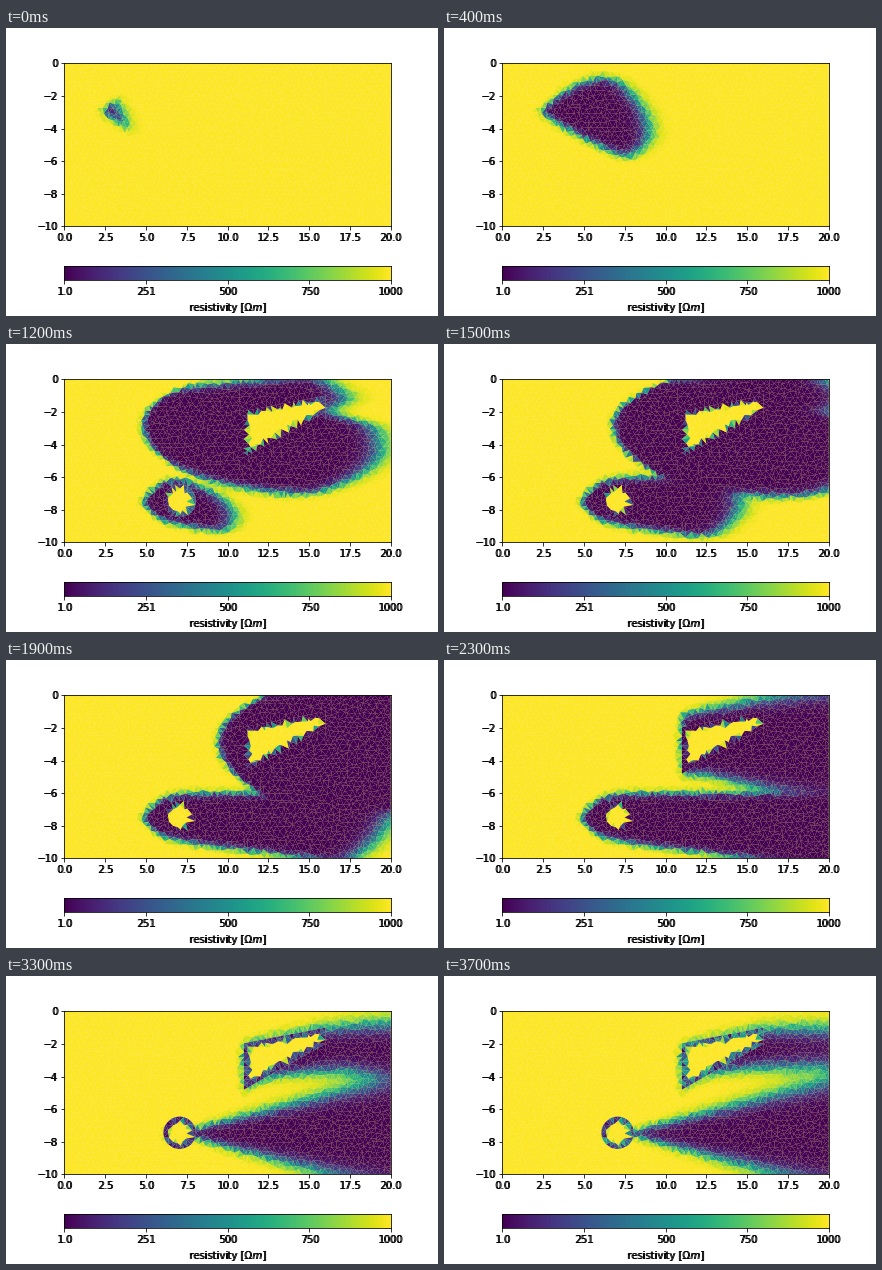
A matplotlib script that plays this animation: 432x288 px, repeating every 3.8 s.

```python
import numpy as np
import matplotlib.pyplot as plt
from matplotlib.animation import FuncAnimation
from matplotlib.collections import PolyCollection
from matplotlib.path import Path
from matplotlib.tri import Triangulation

W, H, DPI = 432, 288, 72
FRAMES, INTERVAL = 38, 100
RHO_MIN, RHO_MAX = 1, 1000
rng = np.random.default_rng(4)
plt.rcParams["font.family"] = "DejaVu Sans"

WEDGE = np.array([(11, -1.95), (16, -1), (16, -2), (11, -4.8)])
ANGLES = np.linspace(0, 2 * np.pi, 24, endpoint=False)
DISC = np.column_stack([7.06 + np.cos(ANGLES), -7.45 + np.sin(ANGLES)])


def depth_inside(points, poly):
    """Distance to the outline, positive inside."""
    edge = np.roll(poly, -1, axis=0) - poly
    rel = points[:, None] - poly
    s = np.clip((rel * edge).sum(-1) / (edge**2).sum(-1), 0, 1)
    dist = np.linalg.norm(rel - s[..., None] * edge, axis=-1).min(axis=1)
    return np.where(Path(poly).contains_points(points), dist, -dist)


def sample_outline(poly, step=0.28):
    parts = []
    for a, b in zip(poly, np.roll(poly, -1, axis=0)):
        n = max(1, round(np.linalg.norm(b - a) / step))
        parts.append(a + (b - a) * np.arange(n)[:, None] / n)
    return np.vstack(parts)


def build_mesh(nx=62, ny=36):
    points = []
    for row in range(ny + 1):
        x = np.linspace(0, 20, nx + 1) + 10 / nx * (row % 2)
        y = np.full(nx + 1, -10 * row / ny)
        inner = (x > 0.1) & (x < 19.9)
        x = x + inner * rng.uniform(-0.1, 0.1, nx + 1)
        if 0 < row < ny:
            y = y + rng.uniform(-0.1, 0.1, nx + 1)
        points.append(np.column_stack([np.clip(x, 0, 20), y]))
    points = np.vstack(points)
    for poly in (WEDGE, DISC):
        far = np.abs(depth_inside(points, poly)) > 0.18
        points = np.vstack([points[far], sample_outline(poly)])
    return points[Triangulation(*points.T).triangles]


triangles = build_mesh()
cells = triangles.mean(axis=1)
X, Y = cells.T
rough = rng.normal(0, 0.04, len(cells))
weak = rng.uniform(0, 1, len(cells))


def soft(distance, width):
    return 1 / (1 + np.exp(-np.clip((distance + rough) / width, -40, 40)))


def ramp(t, start, end):
    return np.clip((t - start) / (end - start), 0, 1)


def mix(a, b, u):
    return a + (b - a) * u


def band(top, bottom, tail, front, side, nose):
    """Soft region enclosed by four curves."""
    return (soft(top - Y, side) * soft(Y - bottom, side)
            * soft(X - tail, 0.1) * soft(front - X, nose))


def upper_plume(t):
    late = ramp(t, 18, 23)
    run = np.maximum(X - 2.3, 0)

    # Fresh plume fans out; later only the wake of the wedge is left.
    top = -3 + 2.3 * np.tanh(run / 2.6) + 0.08 * np.maximum(X - 8, 0)
    top += 0.08 * max(t - 8, 0)
    bottom = -3 - 4.3 * np.tanh(run / 7)

    lift = mix(0.8, 0.05, ramp(t, 23, 29)) - 0.15 * ramp(t, 29, 37)
    wake_top = -1 - 0.2 * np.maximum(16 - X, 0) + lift
    wake_top += 0.15 * np.maximum(X - 16, 0) * (1 - ramp(t, 29, 37))
    rise = 0.95 * ramp(t, 23, 29) + 0.5 * ramp(t, 29, 37)
    wake_bottom = -4.85 + rise * (1 - np.exp(-np.maximum(X - 11, 0) / 1.5))
    wake_bottom -= 0.25 * np.maximum(X - 12.5 - 0.5 * (t - 23), 0)

    bow = np.where(Y > -2.8, 0.45, 0.3) * (1 - 0.9 * late)
    tail = np.clip(2.3 + 0.66 * (t - 8.2), 2.3, 10.95)
    tail = tail + bow * (Y + 2.8)**2 * ramp(t, 8, 11)
    front = 3.75 + 1.3 * t - np.where(Y > -4.2, 0.2, 0.5) * (Y + 4.2)**2
    front -= 2 * ramp(t, 8, 11) * np.exp(-((Y + 2) / 0.6)**2)

    side = 0.12 + 0.02 * late * np.maximum(X - 11, 0)
    return band(mix(top, wake_top, late), mix(bottom, wake_bottom, late),
                tail, front, side, 0.22 + 0.015 * t)


def lower_plume(t):
    if t < 9:
        return np.zeros(len(cells))
    late = ramp(t, 23, 29)
    fan = 1.5 * np.tanh(np.maximum(X - 4.7, 0) / 1.4)
    wake = mix(0.45, 0.12, ramp(t, 29, 37)) + 0.26 * np.maximum(X - 8, 0)
    above = mix(fan, wake, late)
    below = mix(fan + 0.12 * np.maximum(X - 7, 0), wake, late)

    turn = ramp(t, 12, 19)
    front = 6.1 + 1.4 * (t - 9)
    front = front - mix(0.6, 0.2, turn) * (Y - mix(-8.4, -6.5, turn))**2
    side = 0.1 + 0.02 * late * np.maximum(X - 8, 0)
    return band(-7.5 + above, -7.5 - below, mix(4.75, 6.3, late), front,
                side, 0.22 + 0.02 * (t - 9))


# Blocks resist the fluid; only a thin rim of each is slowly invaded.
blocks = [(depth_inside(cells, WEDGE), 8 + 0.4 * (X - 11)),
          (depth_inside(cells, DISC), 9.5 + 0.4 * (X - 6))]


def resistivity(t):
    conc = 1 - (1 - upper_plume(t)) * (1 - lower_plume(t))
    reach = mix(0.22, 0.32, ramp(t, 12, 25))
    fade = 1 - 0.6 * weak * ramp(t, 29, 37)
    for depth, arrival in blocks:
        rim = fade * ramp(t, arrival, arrival + 2.5) * soft(reach - depth, 0.02)
        conc = np.where(depth > 0, rim, conc)
    return RHO_MAX - (RHO_MAX - RHO_MIN) * conc


def rect(left, top, right, bottom):
    return [left / W, 1 - bottom / H, (right - left) / W, (bottom - top) / H]


def add_frame(box, **props):
    # A second set of labels one pixel to the right gives the heavy text.
    left, *rest = box
    fig.add_axes(box, facecolor="none").set(**props)
    echo = fig.add_axes([left + 1 / W, *rest], facecolor="none")
    echo.set(**props)
    echo.spines[:].set_visible(False)
    echo.tick_params(color="none")


fig = plt.figure(figsize=(W / DPI, H / DPI), dpi=DPI, facecolor="white")
map_box = rect(58.4, 35.3, 384.8, 198.4)
bar_box = rect(58.4, 238.3, 384.8, 252.4)

ax = fig.add_axes(map_box, xlim=(0, 20), ylim=(-10, 0), facecolor="#fdf08c")
ax.set(xticks=[], yticks=[])
ax.spines[:].set_visible(False)
mesh = PolyCollection(triangles, array=resistivity(0), cmap="viridis",
                      edgecolors="none", antialiaseds=True)
mesh.set_clim(RHO_MIN, RHO_MAX)
ax.add_collection(mesh, autolim=False)

bar = fig.add_axes(bar_box)
bar.imshow(np.linspace(0, 1, 256)[None], aspect="auto", cmap="viridis")
bar.axis("off")

add_frame(map_box, xlim=(0, 20), ylim=(-10, 0),
          xticks=np.arange(0, 20.1, 2.5), yticks=np.arange(-10, 1, 2))
add_frame(bar_box, xlim=(RHO_MIN, RHO_MAX), yticks=[],
          xticks=np.linspace(RHO_MIN, RHO_MAX, 5),
          xticklabels=["1.0", "251", "500", "750", "1000"],
          xlabel=r"resistivity [$\Omega m$]")


def update(frame):
    mesh.set_array(resistivity(frame))
    return (mesh,)


anim = FuncAnimation(fig, update, frames=FRAMES, interval=INTERVAL,
                     repeat=True, repeat_delay=0)
plt.show()
```
